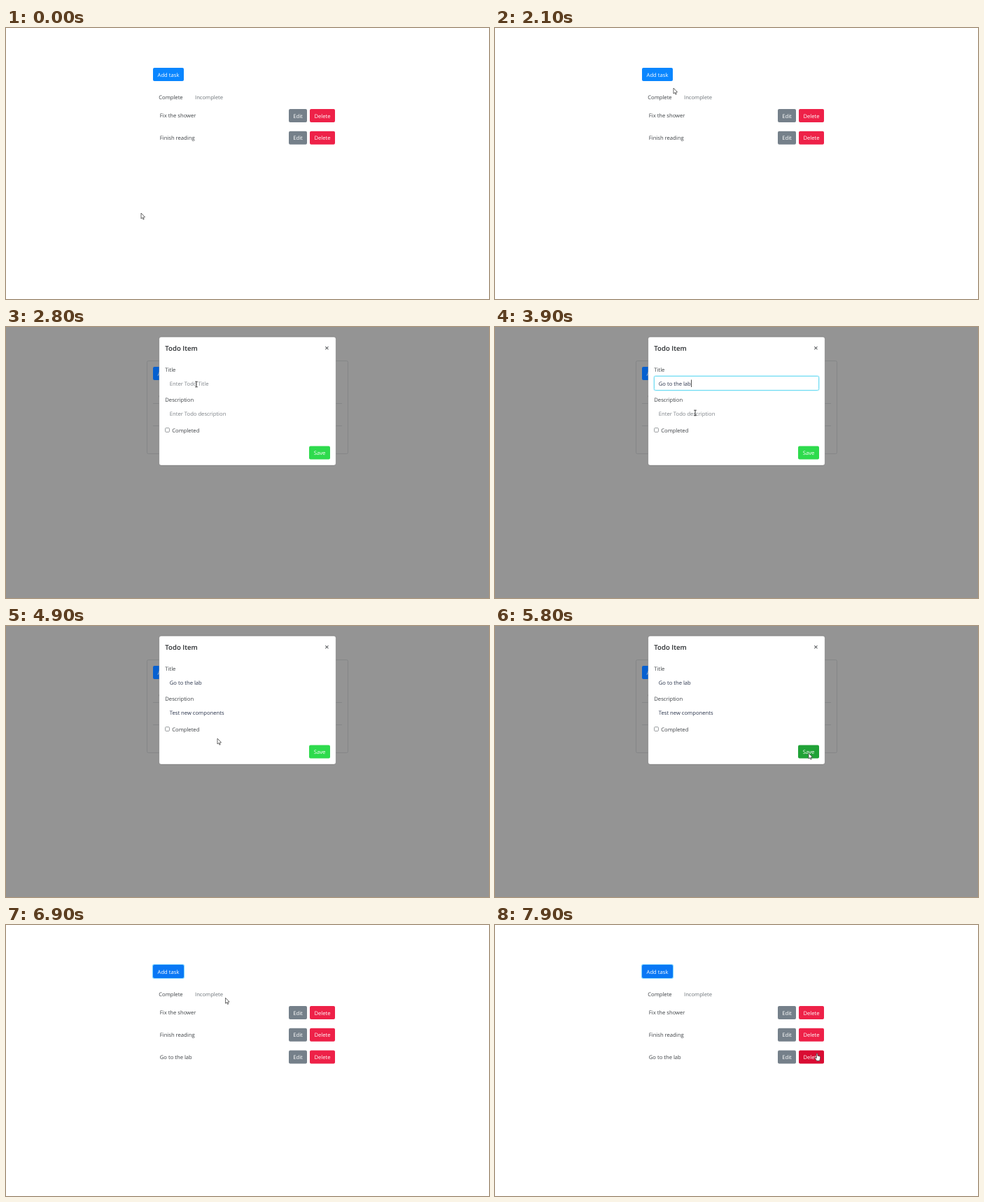
Animation of 690 by 388 pixels, one loop 8000 ms. Source, as an HTML page with a canvas:

```html
<!DOCTYPE html>
<html lang="en">
<head>
<meta charset="utf-8">
<title>Task list</title>
<style>
  html, body { margin: 0; width: 100%; height: 100%; overflow: hidden; background: #fff; }
  canvas { display: block; width: 690px; height: 388px; }
</style>
</head>
<body>
<canvas id="stage"></canvas>
<script>
const W = 690, H = 388, LOOP = 8000, TICK = 100;
const FONT = '"Open Sans", "Noto Sans", sans-serif';
const SIZE = 7.65;

const canvas = document.getElementById('stage');
const ctx = canvas.getContext('2d');
const dpr = window.devicePixelRatio || 1;
canvas.width = W * dpr;
canvas.height = H * dpr;

// Pointer path: time, x, y, shape from that time on
const PATH = [
  [0, 193, 265, 'arrow'],
  [700, 193, 265, 'arrow'],
  [1100, 88, 192, 'arrow'],
  [1350, 150, 118, 'arrow'],
  [1600, 234, 80, 'arrow'],
  [1800, 238, 69, 'hand'],
  [1900, 238, 69, 'hand'],
  [2000, 246, 78, 'arrow'],
  [2100, 255, 86, 'arrow'],
  [2200, 281, 107, 'beam'],
  [2500, 283, 113, 'beam'],
  [2800, 272, 82, 'beam'],
  [3000, 272, 82, 'beam'],
  [3400, 286, 123, 'beam'],
  [3900, 286, 123, 'beam'],
  [4300, 288, 128, 'beam'],
  [4600, 288, 128, 'beam'],
  [4700, 292, 139, 'arrow'],
  [4900, 302, 161, 'arrow'],
  [5000, 302, 161, 'arrow'],
  [5600, 448, 182, 'arrow'],
  [5800, 448, 182, 'arrow'],
  [5900, 449, 184, 'hand'],
  [6000, 428, 203, 'arrow'],
  [6300, 290, 233, 'arrow'],
  [6500, 195, 190, 'arrow'],
  [6800, 292, 87, 'arrow'],
  [7500, 443, 208, 'arrow'],
  [7700, 443, 208, 'arrow'],
  [7800, 452, 193, 'hand'],
  [7900, 460, 184, 'hand']
];

const LIGHT = {
  page: '#fff', ink: '#3d4145', soft: '#6f757a', label: '#fff',
  add: '#0a86ff', addHover: '#0a78f5', edit: '#75808a', del: '#ee2148', delHover: '#d90d33'
};
const DIM = {
  page: '#949494', ink: '#1d1e20', soft: '#1d1e20', label: '#cfcfcf', line: '#858687',
  add: '#0660d0', addHover: '#0660d0', edit: '#575e64', del: '#b3163a', delHover: '#b3163a'
};

function pointerAt(t) {
  let i = PATH.length - 1;
  while (i > 0 && PATH[i][0] > t) i--;
  const a = PATH[i], b = PATH[i + 1] || a;
  const k = b === a ? 0 : (t - a[0]) / (b[0] - a[0]);
  return { x: a[1] + (b[1] - a[1]) * k, y: a[2] + (b[2] - a[2]) * k, shape: a[3] };
}

function text(str, x, y, color, opt = {}) {
  ctx.font = `${opt.weight || 400} ${opt.size || SIZE}px ${FONT}`;
  ctx.textAlign = opt.align || 'left';
  ctx.fillStyle = color;
  ctx.fillText(str, x, y);
}

function box(x, y, w, h, r, fill, stroke, width = 1) {
  ctx.beginPath();
  ctx.roundRect(x, y, w, h, r);
  if (fill) { ctx.fillStyle = fill; ctx.fill(); }
  if (stroke) { ctx.strokeStyle = stroke; ctx.lineWidth = width; ctx.stroke(); }
}

function line(color, ...pts) {
  ctx.beginPath();
  pts.forEach(([x, y], i) => i ? ctx.lineTo(x, y) : ctx.moveTo(x, y));
  ctx.strokeStyle = color;
  ctx.lineWidth = 1;
  ctx.stroke();
}

function button(str, x, y, w, fill, label) {
  box(x, y, w, 19, 2, fill);
  text(str, x + w / 2, y + 12.5, label, { align: 'center', weight: 500 });
}

function drawList(t, dim, p) {
  const c = dim ? DIM : LIGHT;
  const over = (x, y, w) => p.shape === 'hand' && p.x >= x && p.x <= x + w && p.y >= y && p.y <= y + 19;
  ctx.fillStyle = c.page;
  ctx.fillRect(0, 0, W, H);

  if (dim) {
    box(201.5, 48.5, 287, 133, 2, null, c.line);
    line(c.line, [210, 109.5], [261.5, 109.5], [261.5, 88.5], [318.5, 88.5], [318.5, 109.5], [480, 109.5]);
    line(c.line, [210, 141.5], [480, 141.5]);
  }

  const saved = t >= 5900;
  if (saved) box(208.9, 55.9, 46.2, 21.2, 3, '#86d8ff');
  button('Add task', 210, 57, 44, saved || over(210, 57, 44) ? c.addHover : c.add, c.label);
  text('Complete', 218.2, 102.3, c.ink);
  text('Incomplete', 270, 102.3, c.soft);

  const tasks = ['Fix the shower', 'Finish reading'];
  if (saved) tasks.push('Go to the lab');
  tasks.forEach((name, i) => {
    const y = 116 + i * 31.8;
    text(name, 219.8, y + 12.4, c.ink);
    button('Edit', 404, y, 26, c.edit, c.label);
    button('Delete', 434, y, 36, over(434, y, 36) ? c.delHover : c.del, c.label);
  });
}

function field(y, value, hint, focus, caret) {
  if (focus) {
    box(226.8, y - 0.7, 236.4, 21.4, 3, null, 'rgba(120,225,255,.35)', 1.6);
    box(227.5, y, 235, 20, 2, '#fff', '#74dcf0');
  }
  text(value || hint, 233.8, y + 13.4, value ? '#28324a' : '#7c8187');
  if (caret) {
    const x = 233.8 + (value ? ctx.measureText(value).width + 0.3 : 0);
    ctx.fillStyle = '#222';
    ctx.fillRect(x, y + 5, 0.8, 10.5);
  }
}

function drawDialog(t) {
  const k = Math.min(1, (t - 2200) / 250);
  if (k <= 0) return;
  ctx.save();
  ctx.globalAlpha = k;
  ctx.translate(0, -25 * (1 - k) * (1 - k));

  box(218.7, 14.2, 252.6, 183.8, 3, '#fff', 'rgba(0,0,0,.25)', 0.8);
  text('Todo Item', 227.3, 34.2, '#25282b', { size: 9.6, weight: 600 });
  text('×', 458.4, 34.2, '#55585b', { size: 11, weight: 600, align: 'center' });

  const onTitle = t >= 2900 && t < 4200;
  const onText = t >= 4200 && t < 4800;
  const blink = t < 3500 || (t >= 3900 && t < 4200);
  text('Title', 227.3, 64, '#3d4145');
  field(70.5, t >= 3900 ? 'Go to the lab' : '', 'Enter Todo Title', onTitle, onTitle && blink);
  text('Description', 227.3, 107.2, '#3d4145');
  field(114, t >= 4600 ? 'Test new components' : '', 'Enter Todo description', onText, onText);

  box(227.6, 144.6, 5.8, 5.8, 1, '#fff', '#808488', 0.8);
  text('Completed', 237.2, 150.6, '#3d4145');
  button('Save', 433, 170.5, 30, t >= 5600 ? '#20a237' : '#2edb4d', '#fff');
  ctx.restore();
}

function shape(pts, fill) {
  ctx.beginPath();
  pts.forEach(([x, y], i) => i ? ctx.lineTo(x, y) : ctx.moveTo(x, y));
  ctx.closePath();
  ctx.fillStyle = fill;
  ctx.fill();
  ctx.lineWidth = 0.8;
  ctx.strokeStyle = '#444';
  ctx.stroke();
}

const cursors = {
  arrow() {
    shape([[0, 0], [0, 8], [1.8, 6.4], [3, 9.2], [4.2, 8.7], [3.1, 6], [5.5, 5.8]], '#fff');
  },
  beam() {
    ctx.strokeStyle = '#2b2b2b';
    ctx.lineWidth = 0.9;
    ctx.beginPath();
    ctx.moveTo(-1.8, -3.8); ctx.lineTo(1.8, -3.8);
    ctx.moveTo(0, -3.8); ctx.lineTo(0, 3.8);
    ctx.moveTo(-1.8, 3.8); ctx.lineTo(1.8, 3.8);
    ctx.stroke();
  },
  hand() {
    shape([[-0.8, 0], [0.8, 0], [0.9, 3.2], [4.3, 4], [4.8, 5], [4.4, 8],
      [3.6, 10.4], [-0.4, 10.4], [-3, 6.6], [-2.6, 5.6], [-0.8, 6.8]], '#fff');
  }
};

function draw(t) {
  const open = t >= 2200 && t < 5900;
  const p = pointerAt(t);
  ctx.setTransform(dpr, 0, 0, dpr, 0, 0);
  ctx.textRendering = 'geometricPrecision';
  drawList(t, open, p);
  if (open) drawDialog(t);
  ctx.save();
  ctx.translate(p.x, p.y);
  cursors[p.shape]();
  ctx.restore();
}

const start = performance.now();
function loop() {
  const t = (performance.now() - start) % LOOP;
  draw(Math.floor(t / TICK) * TICK);
  requestAnimationFrame(loop);
}
loop();
</script>
</body>
</html>
```
